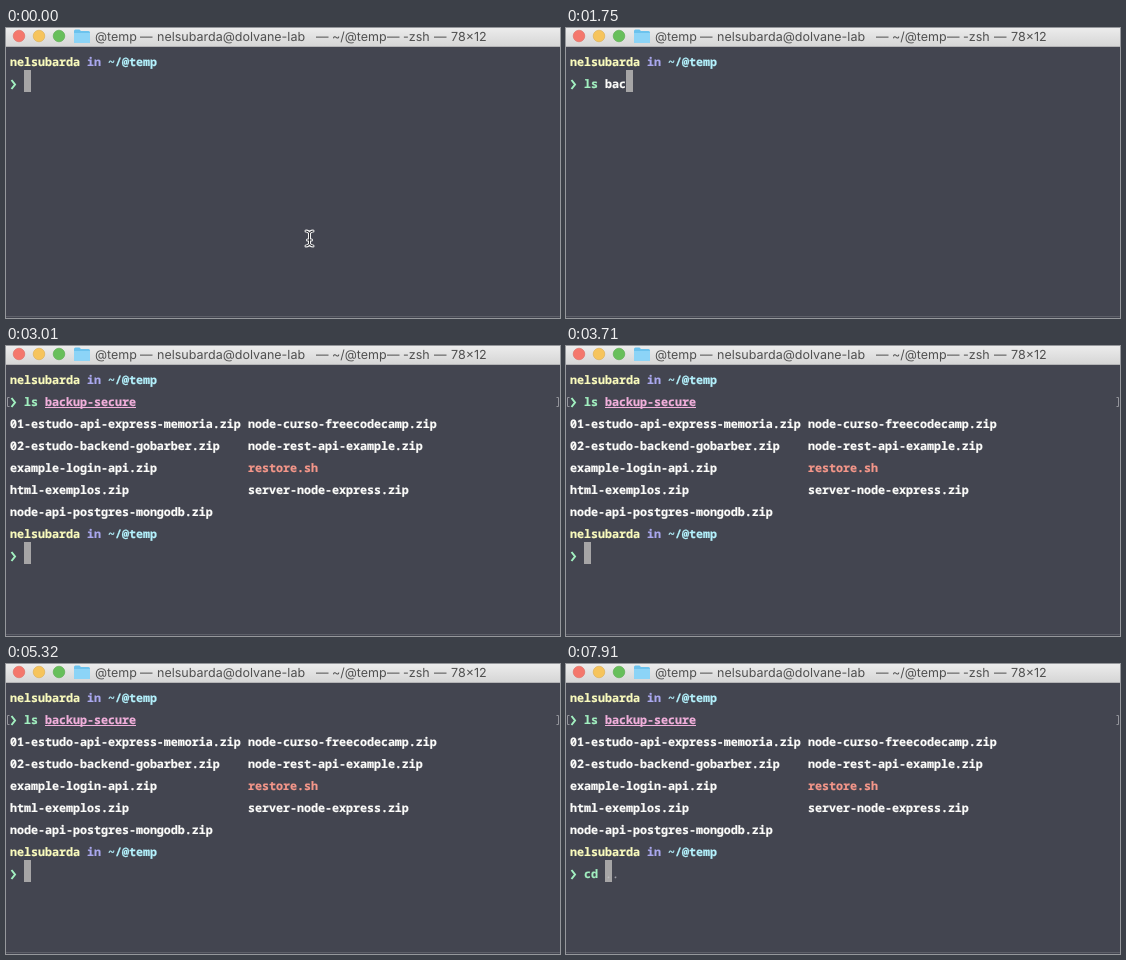
These frames come from a looping animation (554 by 290 pixels, 8 s). An HTML page:

```html
<!DOCTYPE html>
<html lang="en">
<head>
<meta charset="utf-8">
<title>Terminal</title>
<style>
html, body { margin: 0; width: 100%; height: 100%; overflow: hidden; background: #434550; }
svg { display: block; width: 554px; height: 290px; }
text { white-space: pre; text-rendering: geometricPrecision; }
.bar { font: 400 12.5px Inter, "Open Sans", sans-serif; fill: #505050; }
.mono { font: 600 11.667px "Noto Sans Mono", "DejaVu Sans Mono", monospace; stroke-width: .2px; }
.bold { font-weight: 800; }
.light { font-weight: 400; }
</style>
</head>
<body>
<svg viewBox="0 0 554 290" xmlns="http://www.w3.org/2000/svg">
  <defs>
    <linearGradient id="chrome" x2="0" y2="1">
      <stop stop-color="#ececec"/><stop offset="1" stop-color="#d6d6d6"/>
    </linearGradient>
    <path id="beam" d="M300 203q3 0 3.5 2.5q.5-2.5 3.5-2.5M303.5 205v11M300 218q3 0 3.5-2.5q.5 2.5 3.5 2.5M301.5 212h4"/>
  </defs>
  <rect width="554" height="290" fill="#434550"/>
  <rect width="554" height="18" fill="url(#chrome)"/>
  <rect y="18" width="554" height="1" fill="#b4b4b6"/>
  <rect y="288" width="554" height="1" fill="#5d5f68"/>
  <g stroke-width=".6">
    <circle cx="13" cy="8" r="5.8" fill="#f4776c" stroke="#dd6a60"/>
    <circle cx="33" cy="8" r="5.8" fill="#f6c45c" stroke="#dcae50"/>
    <circle cx="53" cy="8" r="5.8" fill="#67bf5b" stroke="#58a84e"/>
  </g>
  <path d="M68 3q0-1.5 1.5-1.5h4l1.5 1.5h7.5q1.5 0 1.5 1.5v9q0 1.5-1.5 1.5h-13q-1.5 0-1.5-1.5z" fill="#6cc3ee"/>
  <path d="M68 5h16v8.500q0 1.5-1.5 1.5h-13q-1.5 0-1.5-1.5z" fill="#8cd4f7"/>
  <g id="title"></g>
  <g id="screen"></g>
  <g id="mouse" fill="none" stroke-linecap="round">
    <use href="#beam" stroke="#f2f2f2" stroke-width="3"/>
    <use href="#beam" stroke="#25262c"/>
  </g>
</svg>
<script>
const LOOP = 8000, CELL = 7, ROW = 22, LEFT = 4;
const USER = 'nelsubarda', HOST = 'dolvane-lab';
const C = {
  white: '#fcfcfa', yellow: '#fafbbd', purple: '#aaa8ee', cyan: '#b4f2fd',
  green: '#a2f0c0', pink: '#f2b0dc', red: '#f5978a', grey: '#9b9ca4',
  slash: '#8b98c4', block: '#a6a5a6'
};
const FILES = [
  ['01-estudo-api-express-memoria.zip', 'node-curso-freecodecamp.zip'],
  ['02-estudo-backend-gobarber.zip', 'node-rest-api-example.zip'],
  ['example-login-api.zip', 'restore.sh'],
  ['html-exemplos.zip', 'server-node-express.zip'],
  ['node-api-postgres-mongodb.zip']
];
// [time, typed text, suggestion]
const FIRST = [
  [0, ''], [140, 'l'], [280, 'ls'], [490, 'ls ', '| cat -exec echo i'],
  [1120, 'ls b'], [1260, 'ls ba'], [1400, 'ls bac'], [1960, 'ls backup-secure/'],
  [2730, 'ls backup-secure']
];
const SECOND = [[0, ''], [6160, 'c'], [6300, 'cd'], [6440, 'cd ', '..']];
const ENTER = 2660, RUN = 2730, OUTPUT = 2800, PROMPT = 2870;

const $ = id => document.getElementById(id);
const colX = col => LEFT + col * CELL;
const at = (keys, t) => keys.filter(k => k[0] <= t).pop();

function put(row, col, str, color, cls = '') {
  return `<text class="mono ${cls}" x="${colX(col)}" y="${38 + row * ROW}" fill="${color}" stroke="${color}">${str}</text>`;
}

function cursor(row, col) {
  return `<rect x="${colX(col)}" y="${20 + row * ROW}" width="7" height="22" fill="${C.block}"/>`;
}

function prompt(row) {
  const y = 30 + (row + 1) * ROW;
  return put(row, 0, USER, C.yellow, 'bold') + put(row, 11, 'in', C.purple) +
    put(row, 14, '~/@temp', C.cyan, 'bold') +
    `<path d="M5.5 ${y}l3.5 4.5l-3.5 4.5" fill="none" stroke="${C.green}" stroke-width="2"/>`;
}

function command(row, [, typed, hint = ''], active, done) {
  const [name, arg = ''] = typed.split(' ');
  const end = 2 + typed.length;
  const known = name === 'ls' || name === 'cd';
  const path = arg.replace('/', '');
  let out = active ? cursor(row, end) : '';
  out += put(row, 2, name, known ? C.green : C.red);
  out += put(row, 5, path, done ? C.pink : C.white);
  if (arg.endsWith('/')) out += put(row, 5 + path.length, '/', C.slash);
  if (done) out += `<rect x="${colX(5)}" y="${39 + row * ROW}" width="${path.length * CELL}" height="1" fill="${C.pink}"/>`;
  if (hint) out += put(row, end, hint[0], '#bdbdbf', 'light') + put(row, end + 1, hint.slice(1), C.grey, 'light');
  return out;
}

function listing() {
  return FILES.map((pair, i) => pair.map((file, j) =>
    put(i + 2, j * 34, file, file.endsWith('.sh') ? C.red : C.white)).join('')).join('');
}

function screen(t) {
  let out = prompt(0) + command(1, at(FIRST, t), t < RUN, t >= RUN);
  if (t >= ENTER) out += `<path d="M3.5 51.5h-2v9h2M550.5 51.5h2v9h-2" fill="none" stroke="#93949b"/>`;
  if (t >= RUN && t < OUTPUT) out += cursor(2, 0);
  if (t >= OUTPUT) out += listing();
  if (t >= OUTPUT && t < PROMPT) out += cursor(7, 0);
  if (t >= PROMPT) out += prompt(7) + command(8, at(SECOND, t), true, false);
  return out;
}

$('title').innerHTML = [
  [89, '@temp'], [134, '—'], [151, USER + '@' + HOST], [310, '—'], [326, '~/@temp'],
  [381, '—'], [397, '-zsh'], [428, '—'], [445, '78×12']
].map(([x, s]) => `<text class="bar" x="${x}" y="13">${s}</text>`).join('');

let shown = '';
function draw(now) {
  const t = now % LOOP;
  const next = screen(t);
  if (next !== shown) $('screen').innerHTML = shown = next;
  $('mouse').style.display = t < 70 ? '' : 'none';
  requestAnimationFrame(draw);
}
draw(0);
</script>
</body>
</html>
```
